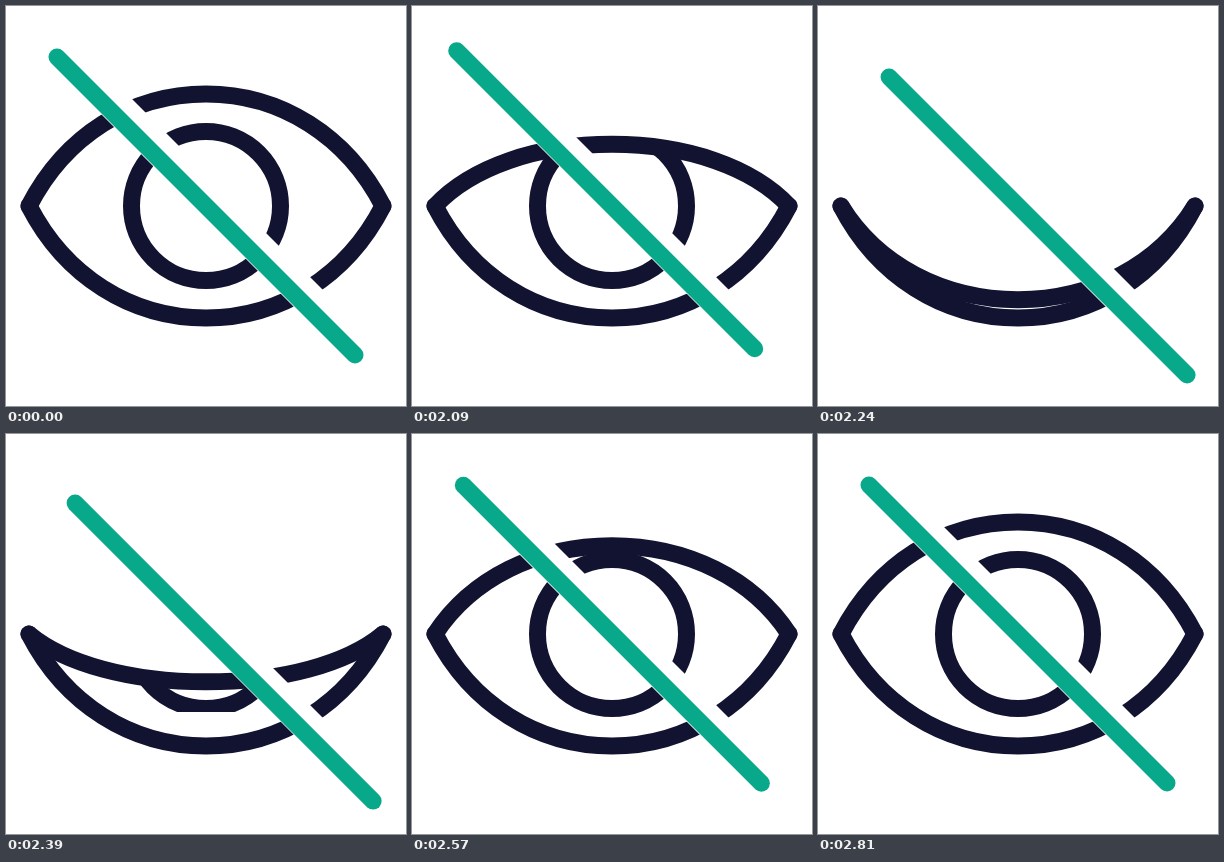
An HTML page that plays this animation: 400x400 px, repeating every 2840 ms.

```html
<!DOCTYPE html>
<html lang="en">
<head>
<meta charset="utf-8">
<title>Blinking eye</title>
<style>
  html, body { margin: 0; width: 100%; height: 100%; overflow: hidden; background: #fff; }
  svg { display: block; width: 100%; height: 100%; }
  .ink { fill: none; stroke: #121331; stroke-width: 17; stroke-linecap: round; stroke-linejoin: round; }
</style>
</head>
<body>
<svg viewBox="0 0 400 400">
  <defs>
    <clipPath id="belowLid"><path id="lidArea"/></clipPath>
    <clipPath id="aboveFloor"><rect id="floor" width="400"/></clipPath>
  </defs>
  <g clip-path="url(#aboveFloor)">
    <circle class="ink" cx="200" cy="200" r="74.5" clip-path="url(#belowLid)"/>
  </g>
  <path id="lower" class="ink"/>
  <path id="lid" class="ink"/>
  <path d="M5-5L405 395" stroke="#fff" stroke-width="32.5"/>
  <path id="slash" d="M51 51L349 349" stroke="#08a88a" stroke-width="17" stroke-linecap="round"/>
</svg>
<script>
const LOOP = 2840, START = 2030, STEP = 30;
const el = id => document.getElementById(id);

// Cubic easing with flat ends; x1 and x2 set how long each end lingers.
function ease(x, x1, x2) {
  if (x <= 0) return 0;
  if (x >= 1) return 1;
  let low = 0, high = 1;
  for (let i = 0; i < 30; i++) {
    const u = (low + high) / 2, v = 1 - u;
    if (3 * u * v * v * x1 + 3 * u * u * v * x2 + u * u * u < x) low = u;
    else high = u;
  }
  return low * low * (3 - 2 * low);
}

function track(time, keys) {
  let value = keys[0].value;
  for (let i = 1; i < keys.length; i++) {
    const a = keys[i - 1], b = keys[i];
    const x = (time - a.at) / (b.at - a.at);
    value += (b.value - a.value) * ease(x, 1 / 3, b.settle);
  }
  return value;
}

const lidKeys = [
  { at: 2001, value: -1 },
  { at: 2291, value: 1, settle: 2 / 3 },
  { at: 2807, value: -1, settle: 0 }
];
const slashKeys = [
  { at: 2000, value: 0 },
  { at: 2140, value: -8.9, settle: 2 / 3 },
  { at: 2310, value: 27.5, settle: 0.39 },
  { at: 2616, value: 0, settle: 0.2 }
];

// bend: -1 is a raised arch, 1 is the bottom of the eye
function curve(bend) {
  const side = 200 + 70 * bend, mid = 200 + 112 * bend;
  return `M23 200C59 ${side} 125 ${mid} 200 ${mid}S341 ${side} 377 200`;
}

function draw(time) {
  const t = time < START ? 0 : START + Math.floor((time - START) / STEP) * STEP;
  const bend = track(t, lidKeys), shift = track(t, slashKeys);
  const lid = curve(bend);
  el("lid").setAttribute("d", lid);
  el("lidArea").setAttribute("d", lid + "V400H23Z");
  el("floor").setAttribute("height", 281.4 - 8 * bend);
  el("slash").setAttribute("transform", `translate(${shift} ${shift})`);
}

el("lower").setAttribute("d", curve(1));
const origin = performance.now();
function tick() {
  draw((performance.now() - origin) % LOOP);
  requestAnimationFrame(tick);
}
tick();
</script>
</body>
</html>
```
